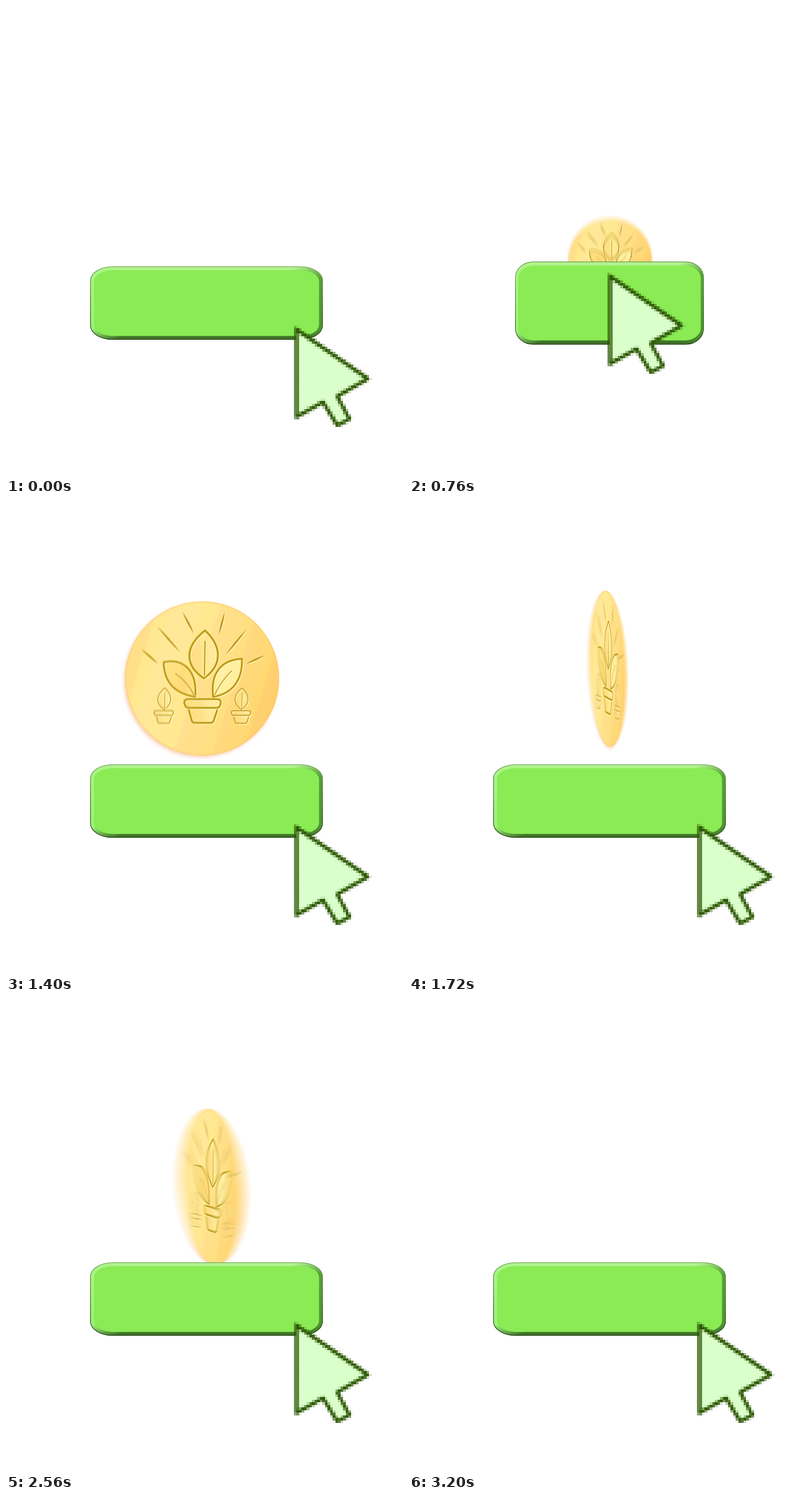
An HTML page with a canvas that plays this animation: 688 by 814 pixels, repeating every 3.84 s.

```html
<!DOCTYPE html>
<html lang="en">
<head>
<meta charset="utf-8">
<title>Coin button</title>
<style>
  html, body { margin: 0; width: 100%; height: 100%; overflow: hidden; background: #fff; }
  canvas { display: block; width: 688px; height: 814px; }
</style>
</head>
<body>
<canvas id="stage" width="688" height="814"></canvas>
<script>
const W = 688, H = 814, LOOP = 3840, STEP = 40;
const APEX = 1900;          // the coin falls as it rose, mirrored around this time
const SHUTTER = 24, SAMPLES = 8;

function makeCanvas(w, h) {
  const c = document.createElement('canvas');
  c.width = w;
  c.height = h;
  return c;
}

// Smooth curve through [time, value] keys
function spline(keys, t) {
  const last = keys.length - 1;
  if (t <= keys[0][0]) return keys[0][1];
  if (t >= keys[last][0]) return keys[last][1];
  let i = 0;
  while (t > keys[i + 1][0]) i++;
  const slope = k => {
    const a = keys[Math.max(k - 1, 0)], b = keys[Math.min(k + 1, last)];
    return (b[1] - a[1]) / (b[0] - a[0]);
  };
  const [t0, v0] = keys[i], [t1, v1] = keys[i + 1];
  const d = t1 - t0, p = (t - t0) / d, q = 1 - p;
  return v0 * (1 + 2 * p) * q * q + slope(i) * d * p * q * q
       + v1 * p * p * (3 - 2 * p) - slope(i + 1) * d * p * p * q;
}

const ease = (t, from, to) => {
  const p = Math.min(1, Math.max(0, (t - from) / (to - from)));
  return 0.5 - 0.5 * Math.cos(Math.PI * p);
};

// Coin motion; height and size depend on the distance from the apex
const coinY = [[0, 282], [220, 286], [340, 290], [500, 302], [660, 320], [780, 337],
               [900, 365], [1140, 440], [1300, 508]];
const coinSize = [[0, 1], [500, 1], [660, 1], [780, 0.94], [900, 0.83], [1140, 0.54], [1300, 0.38]];
const coinX = [[600, 348], [760, 349], [1000, 349], [1400, 340], [2120, 353], [2560, 357], [3200, 348]];
const coinTurn = [[640, -425], [760, -360], [1000, -227], [1400, 0], [2120, 168],
                  [2560, 426], [2800, 560], [3040, 695], [3160, 760]];

// Button squash and stretch
const buttonW = [[560, 1], [600, 1.03], [650, 1.09], [760, 0.811], [870, 1.03], [950, 1]];
const buttonH = [[560, 1], [600, 0.97], [650, 0.9], [760, 1.134], [870, 0.98], [950, 1]];

const COIN = 320, COIN_RES = 2;
const coinArt = drawCoin();
const cursorArt = drawCursor();
const layer = makeCanvas(W, H);
const layerCtx = layer.getContext('2d');
const ctx = document.getElementById('stage').getContext('2d');

function drawCoin() {
  const c = makeCanvas(COIN * COIN_RES, COIN * COIN_RES);
  const g = c.getContext('2d');
  g.scale(COIN_RES, COIN_RES);
  g.translate(COIN / 2, COIN / 2);
  g.lineJoin = g.lineCap = 'round';

  const gold = g.createLinearGradient(-128, -40, 128, 40);
  gold.addColorStop(0, '#ffdc80');
  gold.addColorStop(0.22, '#ffe797');
  gold.addColorStop(0.6, '#ffdd84');
  gold.addColorStop(1, '#ffcc66');
  g.save();
  g.shadowColor = 'rgba(240,150,90,.42)';
  g.shadowBlur = 12;
  g.shadowOffsetX = -5;
  g.shadowOffsetY = 7;
  g.fillStyle = gold;
  g.beginPath();
  g.arc(0, 0, 133.5, 0, 7);
  g.fill();
  g.restore();
  g.strokeStyle = 'rgba(250,196,100,.75)';
  g.lineWidth = 1.5;
  g.beginPath();
  g.arc(0, 0, 132.5, 0, 7);
  g.stroke();

  const shade = g.createLinearGradient(-30, 0, 30, 0);
  shade.addColorStop(0, 'rgba(255,206,96,.5)');
  shade.addColorStop(1, 'rgba(255,244,180,.6)');

  // Engraved line: highlight below, dark gold on top
  function engrave(d, width, color, x = 0, y = 0, scale = 1, filled = true) {
    const path = new Path2D(d);
    g.save();
    g.translate(x, y);
    g.scale(scale, scale);
    if (filled) {
      g.fillStyle = shade;
      g.fill(path);
    }
    g.lineWidth = width / scale;
    g.translate(1.4 / scale, 1.6 / scale);
    g.strokeStyle = 'rgba(255,245,190,.8)';
    g.stroke(path);
    g.translate(-1.4 / scale, -1.6 / scale);
    g.strokeStyle = color;
    g.stroke(path);
    g.restore();
  }

  const leaf = 'M5 -83C36 -54 34 -22 3 0C-30 -22 -32 -54 5 -83Z';
  const vein = 'M5 -64L4 -6';
  const rim = 'M-24 36H25Q33 36 32 43Q31 51 25 51H-24Q-29 51 -31 43Q-32 36 -24 36Z';
  const body = 'M-24 52L-18 73Q-17 77 -13 77H15Q19 77 20 73L27 52';
  const line = '#b8930f', soft = '#c7a02c';

  engrave('M-67 -28C-30 -36 -8 -10 -12 32C-52 26 -66 2 -67 -28Z', 3, line);
  engrave('M-46 -8Q-26 6 -14 29', 1.8, soft, 0, 0, 1, false);
  engrave('M69 -34C32 -32 14 -8 19 32C54 26 70 2 69 -34Z', 3, line);
  engrave('M51 -13Q32 6 22 28', 1.8, soft, 0, 0, 1, false);
  engrave(leaf, 3.2, line);
  engrave(vein, 2, line, 0, 0, 1, false);
  engrave(body, 3, line);
  engrave(rim, 3, line);
  for (const x of [-67, 67]) {
    engrave(leaf, 1.7, soft, x, 54, 0.45);
    engrave(vein, 1.3, soft, x, 54, 0.45, false);
    engrave(body, 2, soft, x, 37, 0.53);
    engrave(rim, 2, soft, x, 37, 0.53);
  }

  const rays = [[-106, -51, -76, -25], [-78, -90, -38, -45], [-34, -115, -14, -77],
                [39, -115, 29, -75], [77, -85, 40, -40], [109, -40, 76, -25]];
  for (const [x0, y0, x1, y1] of rays) {
    const len = Math.hypot(x1 - x0, y1 - y0);
    const nx = (y1 - y0) / len * 3.2, ny = (x0 - x1) / len * 3.2;
    const mx = (x0 + x1) / 2, my = (y0 + y1) / 2;
    const sliver = (off, color) => {
      g.fillStyle = color;
      g.beginPath();
      g.moveTo(x0 + off, y0 + off);
      g.quadraticCurveTo(mx + nx + off, my + ny + off, x1 + off, y1 + off);
      g.quadraticCurveTo(mx - nx + off, my - ny + off, x0 + off, y0 + off);
      g.fill();
    };
    sliver(1.4, 'rgba(255,245,190,.8)');
    sliver(0, '#b9941a');
  }
  return c;
}

// Drawn tiny and enlarged without smoothing for the blocky edge
function drawCursor() {
  const px = 4.5, c = makeCanvas(32, 42), g = c.getContext('2d');
  g.scale(1 / px, 1 / px);
  const arrow = new Path2D('M9 11L133 96L80 127L101 166L80 177L55 137L9 163Z');
  g.fillStyle = '#daffcb';
  g.fill(arrow);
  g.strokeStyle = '#2f5a06';
  g.lineWidth = 6.5;
  g.lineJoin = 'round';
  g.stroke(arrow);
  g.fillStyle = 'rgba(47,90,6,.35)';
  g.fillRect(4.5, 4.5, 4.5, 4.5);
  return { image: c, w: 32 * px, h: 42 * px };
}

function drawCoinAt(t) {
  layerCtx.setTransform(1, 0, 0, 1, 0, 0);
  layerCtx.clearRect(0, 0, W, H);
  layerCtx.globalCompositeOperation = 'lighter';
  layerCtx.globalAlpha = 1 / SAMPLES;
  for (let i = 0; i < SAMPLES; i++) {
    const at = t + SHUTTER * ((i + 0.5) / SAMPLES - 0.5);
    const u = Math.abs(at - APEX);
    const size = spline(coinSize, u);
    const turn = spline(coinTurn, at) * Math.PI / 180;
    // Spin seen slightly from above: narrowing plus a vertical shear
    layerCtx.setTransform(size * Math.cos(turn), size * 0.14 * Math.sin(turn), 0, size,
                          spline(coinX, at), spline(coinY, u));
    layerCtx.drawImage(coinArt, -COIN / 2, -COIN / 2, COIN, COIN);
  }
  ctx.drawImage(layer, 0, 0);
}

function roundBox(w, h, rx, ry) {
  const p = new Path2D(), x = w / 2, y = h / 2, q = Math.PI / 2;
  p.ellipse(x - rx, y - ry, rx, ry, 0, 0, q);
  p.ellipse(rx - x, y - ry, rx, ry, 0, q, 2 * q);
  p.ellipse(rx - x, ry - y, rx, ry, 0, 2 * q, 3 * q);
  p.ellipse(x - rx, ry - y, rx, ry, 0, 3 * q, 4 * q);
  p.closePath();
  return p;
}

const buttonOuter = roundBox(402, 126, 38, 24);
const buttonInner = roundBox(390, 114, 33, 19);
const bevel = ctx.createConicGradient(-Math.PI / 2, 0, 0);
[[0, '#b0f38c'], [0.19, '#b0f38c'], [0.215, '#57a037'], [0.285, '#4f9431'], [0.31, '#3f7128'],
 [0.69, '#3f7128'], [0.715, '#9df277'], [0.785, '#a6f580'], [0.81, '#b0f38c'], [1, '#b0f38c']]
  .forEach(([at, color]) => bevel.addColorStop(at, color));
const rimLine = ctx.createLinearGradient(0, -63, 0, 63);
rimLine.addColorStop(0, '#6d9a55');
rimLine.addColorStop(1, '#1d3a10');

function drawButton(t) {
  ctx.save();
  ctx.translate(347.5, 514.5);
  ctx.scale(spline(buttonW, t), spline(buttonH, t));
  ctx.fillStyle = bevel;
  ctx.fill(buttonOuter);
  ctx.fillStyle = '#8aeb55';
  ctx.fill(buttonInner);
  ctx.strokeStyle = rimLine;
  ctx.lineWidth = 1.2;
  ctx.stroke(buttonOuter);
  ctx.restore();
}

function drawPointer(t) {
  const near = ease(t, 40, 540) - ease(t, 760, 1100);
  const x = 494 - 155 * near;
  const y = 549 - 92 * Math.pow(Math.max(near, 0), 0.75);
  ctx.imageSmoothingEnabled = false;
  ctx.drawImage(cursorArt.image, Math.round(x), Math.round(y), cursorArt.w, cursorArt.h);
  ctx.imageSmoothingEnabled = true;
}

function render(t) {
  ctx.fillStyle = '#fff';
  ctx.fillRect(0, 0, W, H);
  if (t > 600 && t < 3200) drawCoinAt(t);
  drawButton(t);
  drawPointer(t);
}

const start = performance.now();
function tick() {
  const t = (performance.now() - start) % LOOP;
  render(Math.floor(t / STEP) * STEP);
  requestAnimationFrame(tick);
}
tick();
</script>
</body>
</html>
```
